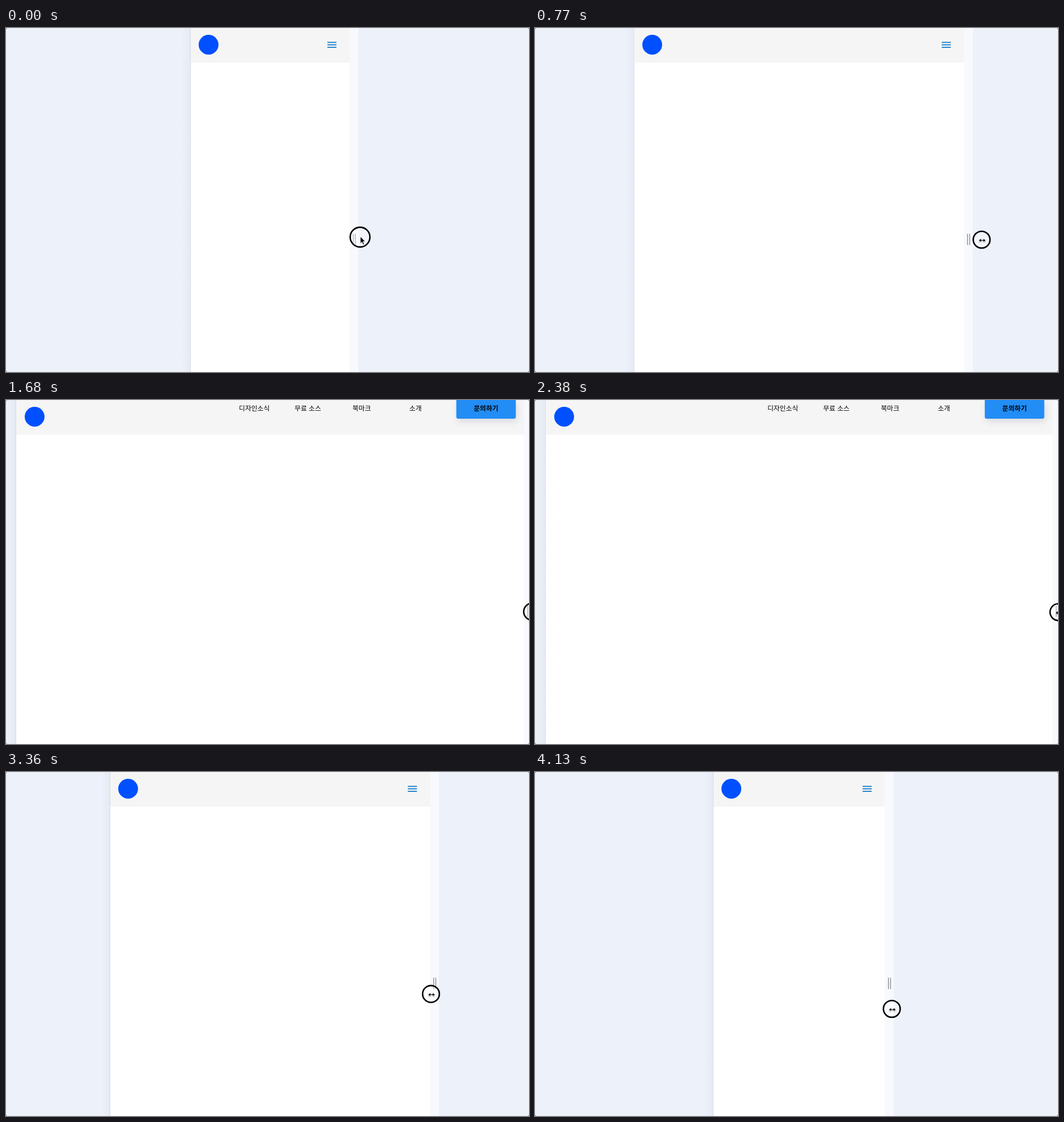
Write an HTML page that moves like this. It is 923x607 px and loops after 4200 ms.

```html
<!DOCTYPE html>
<html lang="ko">
<head>
<meta charset="utf-8">
<style>
  html, body { margin: 0; width: 100%; height: 100%; overflow: hidden; background: #777; }
  svg { display: block; border-radius: 3px; background: #ecf1fa; }
  text { font: 11.8px "Noto Sans CJK KR", "Noto Sans CJK", sans-serif; text-anchor: middle; }
  .bold { font-weight: 700; }
  .button { filter: drop-shadow(2px 5px 6px rgba(50, 60, 100, .14)); }
</style>
</head>
<body>
<svg width="923" height="607" viewBox="0 0 923 607">
  <defs>
    <linearGradient id="shade">
      <stop offset="0" stop-color="#303848" stop-opacity="0"/>
      <stop offset="1" stop-color="#303848" stop-opacity=".04"/>
    </linearGradient>
  </defs>

  <g id="left">
    <rect x="-16" width="16" height="607" fill="url(#shade)"/>
    <rect x="-1" width="1" height="607" fill="#d8dbe2"/>
  </g>
  <rect id="page" height="607" fill="#fff"/>
  <rect id="header" height="61" fill="#f5f5f5"/>
  <circle id="logo" cy="29.5" r="17.5" fill="#0050ff"/>

  <g id="right">
    <rect width="15.3" height="607" fill="#f7f9fd"/>
    <path d="M6 363v20M9.8 363v20" stroke="#8e9096" stroke-width="1.4"/>
    <path id="burger" d="M-39.5 25.3h16m-16 4.4h16m-16 4.5h16" stroke="#0a79c9" stroke-width="1.8"/>
    <g id="nav">
      <text x="-476.5" y="19">디자인소식</text>
      <text x="-382" y="19">무료 소스</text>
      <text x="-287" y="19">북마크</text>
      <text x="-192" y="19">소개</text>
      <rect class="button" x="-120" y="-2" width="105" height="35" rx="3.5" fill="#228df5"/>
      <text class="bold" x="-67.5" y="19">문의하기</text>
    </g>
  </g>

  <g id="pointer">
    <circle id="ring" fill="#fff" fill-opacity=".3" stroke="#000" stroke-width="2.6"/>
    <path id="arrow" d="M.5 -1v12.2l2.8-2.6 2 4.6 2-.9-2-4.5h3.8z" stroke="#fff" stroke-width=".7"/>
    <g id="resize">
      <path d="M-6 3.5l4-3v2h6v-2l4 3-4 3v-2h-6v2z" fill="#777" opacity=".3"/>
      <path d="M-5.2 1.2l4.2-3.4v2.4h4v-2.4l4.2 3.4-4.2 3.4v-2.4h-4v2.4z" stroke="#fff" stroke-width=".7"/>
    </g>
  </g>
</svg>
<script>
const LOOP = 4200, STEP = 70, MIRROR = 932.7, NAV_WIDTH = 868;
const GRAB = 140, CLOSE = 2170, LAG = 42;

// Drag path: time, left edge of the page
const DRAG = [
  [0, 326], [350, 317], [490, 292], [700, 205], [1050, 74], [1680, 18],
  [1820, 14], [CLOSE, 14], [2870, 57], [3360, 184], [3780, 283], [4130, 315]
];

const el = id => document.getElementById(id);
const move = (id, x, y = 0) => el(id).setAttribute('transform', `translate(${x} ${y})`);
const show = (id, on) => el(id).setAttribute('visibility', on ? 'visible' : 'hidden');

const slope = i => (DRAG[i + 1][1] - DRAG[i][1]) / (DRAG[i + 1][0] - DRAG[i][0]);

function tangent(i) {
  if (i === 0 || i === DRAG.length - 1) return 0;
  const a = slope(i - 1), b = slope(i);
  return a * b > 0 ? 2 * a * b / (a + b) : 0;
}

// Monotone cubic through the drag path
function leftEdge(t) {
  const n = DRAG.findIndex(k => k[0] > t);
  if (n < 0) return DRAG[DRAG.length - 1][1];
  const [t0, x0] = DRAG[n - 1], [t1, x1] = DRAG[n];
  const d = t1 - t0, u = (t - t0) / d, v = 1 - u;
  return v * v * ((1 + 2 * u) * x0 + u * d * tangent(n - 1))
       + u * u * ((1 + 2 * v) * x1 - v * d * tangent(n));
}

function draw(now) {
  const t = Math.floor(now % LOOP / STEP) * STEP;
  const left = leftEdge(t), right = MIRROR - left, width = right - left;
  const wide = width >= NAV_WIDTH, grip = Math.min(t / GRAB, 1);

  move('left', left);
  move('right', right);
  for (const id of ['page', 'header']) {
    el(id).setAttribute('x', left);
    el(id).setAttribute('width', width);
  }
  el('logo').setAttribute('cx', left + (wide ? 32.5 : 31.5));
  show('nav', wide);
  show('burger', !wide);

  // The page trails the pointer, which sinks while closing
  const sink = Math.max(0, (t - CLOSE) / (4130 - CLOSE)) ** 1.8;
  move('pointer', MIRROR - leftEdge(t + LAG) + 12 + 6 * (1 - grip), 369 + 4.5 * grip + 44.5 * sink);
  el('ring').setAttribute('r', 17.4 - 2.6 * grip);
  show('arrow', grip < 1);
  show('resize', grip === 1);
}

function frame() {
  draw(performance.now());
  requestAnimationFrame(frame);
}
frame();
</script>
</body>
</html>
```
